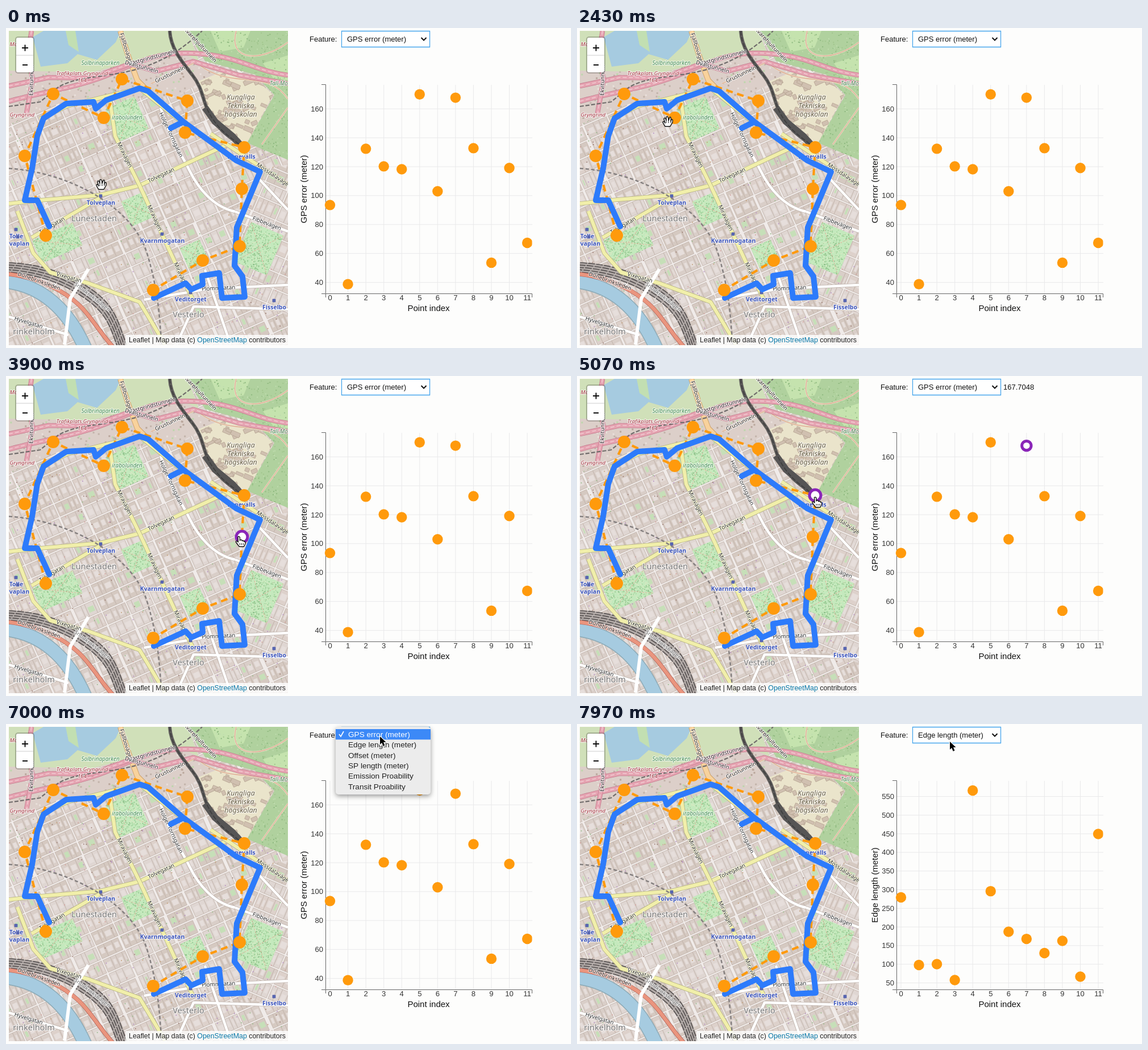
An HTML page with a canvas that plays this animation: 994x563 px, repeating every 8000 ms.

```html
<!DOCTYPE html>
<html lang="en">
<head>
<meta charset="utf-8">
<title>Map matching and point features</title>
<style>
html, body { margin: 0; width: 100%; height: 100%; overflow: hidden; background: #fdfdfc; }
canvas { display: block; }
</style>
</head>
<body>
<canvas id="stage" width="994" height="563"></canvas>
<script>
const W = 994, H = 563, LOOP = 8000;
const SANS = '"Liberation Sans", Arial, sans-serif';
const MAP_FONT = '"Noto Sans", sans-serif';
const ORANGE = '#ff9a0c', PURPLE = '#8a25b8', BLUE = '#2d7bfb';
const GRID_ANGLE = -24, EAST_ANGLE = 23;
const stage = document.getElementById('stage').getContext('2d');
let ctx = stage;

let seed = 7;
const random = () => (seed = (seed * 16807) % 2147483647) / 2147483647;
const pick = list => list[Math.floor(random() * list.length)];

function fill(path, color) {
  ctx.fillStyle = color;
  ctx.fill(new Path2D(path));
}

function line(path, color, width, dash = []) {
  ctx.strokeStyle = color;
  ctx.lineWidth = width;
  ctx.setLineDash(dash);
  ctx.stroke(new Path2D(path));
  ctx.setLineDash([]);
}

function placed(x, y, degrees, paint) {
  ctx.save();
  ctx.translate(x, y);
  ctx.rotate(degrees * Math.PI / 180);
  paint();
  ctx.restore();
}

function clipped(path, paint) {
  ctx.save();
  ctx.clip(new Path2D(path));
  paint();
  ctx.restore();
}

function text(string, x, y, size = 13, color = '#111', align = 'left') {
  ctx.font = `${size}px ${SANS}`;
  ctx.textAlign = align;
  ctx.fillStyle = color;
  ctx.fillText(string, x, y);
}

function label(string, x, y, size, color, degrees = 0, style = '') {
  placed(x, y, degrees, () => {
    ctx.font = `${style} ${size}px ${MAP_FONT}`;
    ctx.textAlign = 'center';
    ctx.textBaseline = 'middle';
    ctx.strokeStyle = 'rgba(255,255,255,.7)';
    ctx.lineWidth = 2.2;
    ctx.strokeText(string, 0, 0);
    ctx.fillStyle = color;
    ctx.fillText(string, 0, 0);
  });
}

// Writes a name on a path, turned to the direction of the path there.
function labelAlong(path, name, fraction, color = '#292929') {
  const curve = document.createElementNS('http://www.w3.org/2000/svg', 'path');
  curve.setAttribute('d', path);
  const at = curve.getTotalLength() * fraction;
  const a = curve.getPointAtLength(at - 9), b = curve.getPointAtLength(at + 9);
  const degrees = Math.atan((b.y - a.y) / (b.x - a.x)) * 180 / Math.PI;
  label(name, (a.x + b.x) / 2, (a.y + b.y) / 2, 9.8, color, degrees);
}

function house(x, y, w, h, color, edge) {
  ctx.fillStyle = color;
  ctx.fillRect(x, y, w, h);
  ctx.strokeStyle = edge;
  ctx.lineWidth = .7;
  ctx.strokeRect(x, y, w, h);
}

// City blocks: terraced houses round small courtyards.
function blocks(x, y, degrees, w, h) {
  const street = 3, reach = 480;
  placed(x, y, degrees, () => {
    for (let u = -reach; u < reach; u += w + street) {
      for (let v = -reach; v < reach; v += h + street) {
        const tone = pick(['#d9cec8', '#ddd1cb', '#d5c9c1', '#dfd6d2']);
        for (let p = 0; p < w - 5;) {
          const lot = Math.min(7 + random() * 9, w - p);
          house(u + p, v, lot, h, tone, '#bfb1a8');
          ctx.fillStyle = random() < .12 ? '#c6dfb8' : '#e6dedb';
          ctx.fillRect(u + p + 2.5, v + 5 + random() * 3, Math.max(1, lot - 5), h - 13);
          p += lot;
        }
      }
    }
  });
}

function speckle(count, colors, size, x, y, w, h) {
  for (let i = 0; i < count; i++) {
    ctx.fillStyle = pick(colors);
    ctx.fillRect(x + random() * w, y + random() * h, size, size);
  }
}

function park(x, y, w, h, degrees) {
  placed(x, y, degrees, () => {
    const plot = `M${-w / 2} ${-h / 2}h${w}v${h}h${-w}Z`;
    fill(plot, '#c4e9bd');
    clipped(plot, () => {
      speckle(w * h / 9, ['#8cc088', '#a6d59f', '#d9e8c2'], 1.7, -w / 2, -h / 2, w, h);
      line(`M${-w / 2} ${-h / 2}L${w / 2} ${h / 2}M${-w / 2} ${h / 2}L${w / 2} ${-h / 2}`, '#dfb39c', 1, [3, 2]);
    });
  });
}

const EAST = 'M447 250L403 325 412 350 404 420 420 480 496 505V240Z';
const LAKE = 'M47 16L66 5H202L193 25 160 56 126 46 108 62 61 68Z';
const FOREST = 'M318 5H496V232L424 202 472 118 438 82 350 58Z';
const CAMPUS = 'M335 95L385 75 436 84 470 118 423 204 352 150Z';
const CANAL = 'M0 446C62 454 108 492 140 565';
const RAILYARD = 'M0 421C60 424 105 440 145 468S190 520 206 565';
const EAST_RAIL = 'M288 5C290 35 306 55 328 83S344 133 365 162 395 190 421 214';
const METRO = 'M5 247C120 255 225 320 248 396S270 520 274 557';

function drawTerrain() {
  fill('M0 0H500V560H0Z', '#f0ebe9');
  blocks(170, 230, GRID_ANGLE, 42, 23);
  clipped(EAST, () => {
    fill(EAST, '#f0ebe9');
    blocks(440, 330, EAST_ANGLE, 40, 25);
  });
  speckle(420, ['#b68fc4', '#d3a09c', '#c3a07b', '#9a7b72', '#95ba8a'], 1.7, 5, 160, 490, 397);

  fill('M5 5H320L340 60 250 112 120 118 40 150 5 158Z', '#d0e0b9');
  clipped('M5 75L150 78 300 40 380 75 300 120 105 128 5 170Z', () => {
    fill('M0 0H400V200H0Z', '#dccfc9');
    speckle(420, ['#b9a69b', '#e8dfda', '#bdd6ac', '#c2b3aa'], 3, 5, 40, 370, 130);
  });
  fill(LAKE, '#a6cbe0');
  fill('M105 5H122L128 42 110 30Z', '#c2dfb2');
  fill(FOREST, '#b0d19e');
  fill('M360 5H430L418 34 376 42ZM452 62L496 48V92L470 88Z', '#c5e3ae');
  clipped(FOREST, () => speckle(700, ['#8fba80', '#a2c68e', '#bfdcae'], 2, 318, 5, 178, 225));
  fill(CAMPUS, '#eae4cb');
  clipped(CAMPUS, () => {
    for (let i = 0; i < 75; i++) {
      placed(340 + random() * 128, 80 + random() * 118, pick([GRID_ANGLE, EAST_ANGLE]), () =>
        house(0, 0, 5 + random() * 14, 4 + random() * 5, '#d0c0b0', '#b3a18f'));
    }
  });

  park(213, 160, 56, 62, GRID_ANGLE);
  park(233, 318, 46, 48, GRID_ANGLE);
  park(90, 378, 78, 44, GRID_ANGLE);
  park(331, 398, 38, 40, GRID_ANGLE);
  park(445, 388, 62, 76, EAST_ANGLE);
}

const ROAD_STYLES = {
  path: { color: '#dca98c', width: 1.2, casing: '#efe2cf' },
  street: { color: '#fff', width: 4.5, casing: '#bdb1aa' },
  avenue: { color: '#f1efaa', width: 6, casing: '#b5b283' },
  primary: { color: '#f8d29c', width: 8, casing: '#c99b60' },
  quay: { color: '#ea957e', width: 6, casing: '#b2645a' },
  motorway: { color: '#e5a3b1', width: 7, casing: '#c47a8d', centre: '#f2cbd2' },
};

// Style, path, name, and how far along the path the name stands.
const ROADS = [
  ['path', 'M340 65C400 110 460 70 496 125M405 5C390 60 450 60 496 25M450 205L496 140'],
  ['street', 'M272 140C286 190 308 220 323 251S365 315 403 323', 'Holger Tornsgatan', .22],
  ['street', 'M403 323L496 358', 'Fibbevägen', .6],
  ['street', 'M243 478L355 459 496 452', 'Plommgatan', .52],
  ['street', 'M5 508L110 540', 'Hyvelgatan', .33],
  ['street', 'M300 557L330 490 496 495M350 425L395 557M440 260L496 320'],
  ['avenue', 'M5 309L60 303 165 294 235 277 385 207', 'Tolvegatan', .69],
  ['avenue', 'M45 369L165 299', 'Tolvegatan', .3],
  ['avenue', 'M183 128L192 190 235 277 310 440 330 480', 'Miravägen', .26, .58, .87],
  ['avenue', 'M20 322L48 396 78 430 145 449 235 482 280 557', 'Vixegatan', .42],
  ['avenue', 'M360 186L496 276', 'Mossdalavägen', .82],
  ['avenue', 'M60 160L108 137 235 106 312 168'],
  ['primary', 'M201 5L216 52 231 92 250 111', 'Fjällbovägen', .28],
  ['motorway', 'M5 129C65 112 130 105 190 78S285 39 350 46 440 76 496 83', 'Västgrindstunneln', .52],
  ['motorway', 'M5 102L75 87 150 88 218 63 264 76 330 59 410 83 496 98', 'Dvalstunneln', .475],
  ['motorway', 'M45 5L38 50 47 90 36 150', 'Ekvitunneln', .6],
  ['path', 'M255 98L330 62', 'Grustunneln', .45],
  ['path', 'M318 5L365 55', 'Kvarnhjultunneln', .5],
  ['quay', 'M5 433C70 441 118 472 142 502S174 547 192 565', 'Dunebrinksleden', .23],
];

function drawRoads() {
  line(CANAL, '#8eabb7', 25);
  line(CANAL, '#a6cbe0', 22);
  line(RAILYARD, '#b3aba8', 19);
  for (let shift = -8; shift <= 8; shift += 4) {
    placed(shift * .7, -shift, 0, () => line(RAILYARD, '#575252', 1.7, [12, 2]));
  }
  for (const [kind, path] of ROADS) {
    const { color, width, casing, centre } = ROAD_STYLES[kind];
    line(path, casing, width + 1.6);
    line(path, color, width);
    if (centre) line(path, centre, 1.5, [7, 4]);
  }
  line('M145 424L113 476 103 557', '#fff', 6);
  line('M5 138L60 130 92 104C150 70 240 105 345 5', '#706c6b', 2.2, [7, 3]);
  line(EAST_RAIL, '#5c5a59', 6);
  line('M350 140L368 165 398 190 420 214', '#565555', 12);
  line(EAST_RAIL, '#3c3c3c', 1.5, [8, 3]);
  line(METRO, '#858080', 2.5, [6, 4]);
}

const PLACES = [
  { color: '#a4313d', size: 9.7, style: 'italic',
    names: { 'Trafikplats Gryngrind': [134, 80], '164': [134, 92], 's Gryngrind': [25, 153], 'Mosse': [20, 29] } },
  { color: '#3e8a50', size: 9.9, style: 'italic',
    names: { 'Solbrinaparken': [166, 62], 'irabolunden': [213, 158], 'Tall-Mo': [480, 98] } },
  { color: '#696047', size: 12.5, style: 'italic',
    names: { 'Kungliga': [413, 122], 'Tekniska': [413, 137], 'högskolan': [413, 152] } },
  { color: '#3c55bd', size: 10.5, style: '600', stop: true,
    names: { 'Tolveplan': [167, 308], 'Kvarnmogatan': [275, 375], 'Veditorget': [325, 478], 'Lunevalls': [414, 227],
      'Fisselbo': [472, 492], 'Tolle': [18, 367], 'rvaplan': [21, 380] } },
  { color: '#777', size: 14.5, style: '',
    names: { 'Lunestaden': [155, 336], 'Vesterlo': [321, 505], 'rinkelholm': [49, 535] } },
];

function drawNames() {
  for (const [, path, name, ...fractions] of ROADS) {
    for (const fraction of fractions) labelAlong(path, name, fraction);
  }
  labelAlong(RAILYARD, 'Snodkroksbågen', .6, '#777');
  for (const { color, size, style, stop, names } of PLACES) {
    for (const [name, [x, y]] of Object.entries(names)) {
      if (stop) house(x - 3, y - 15, 5, 5, '#5967b4', '#4a57a5');
      label(name, x, y, size, color, 0, style);
    }
  }
}

const POINT_RADIUS = 11;
const mapPoints = [[70, 365], [33, 225], [83, 116], [172, 158], [204, 90], [319, 128],
  [315, 184], [419, 210], [415, 283], [411, 384], [346, 409], [259, 461]];
const ROUTE = 'M260 475L316 449 326 460 346 451 345 436 375 431 380 475 420 473 416 437 402 418 406 351 447 253 ' +
  '405 233 312 165 250 111 235 106 176 127 158 142 154 130 106 133 66 159 55 190 46 247 33 303H55L76 349M312 165L290 176';

function drawControls() {
  ctx.fillStyle = 'rgba(0,0,0,.22)';
  ctx.beginPath();
  ctx.roundRect(16, 15, 34, 65, 5);
  ctx.fill();
  ctx.fillStyle = '#fff';
  ctx.beginPath();
  ctx.roundRect(18, 17, 30, 61, 3);
  ctx.fill();
  line('M18 48H48', '#ccc', 1);
  line('M28 35H39M33.5 29.5V40.5M29 65H38', '#111', 2);
  ctx.fillStyle = 'rgba(255,255,255,.8)';
  ctx.fillRect(210, 540, 286, 18);
  const parts = [['Leaflet | Map data (c) ', '#222'], ['OpenStreetMap', '#0878a8'], [' contributors', '#222']];
  let x = 216;
  for (const [part, color] of parts) {
    text(part, x, 553, 12.4, color);
    x += ctx.measureText(part).width;
  }
}

function buildMap() {
  const layer = document.createElement('canvas');
  layer.width = W;
  layer.height = H;
  ctx = layer.getContext('2d');
  ctx.beginPath();
  ctx.rect(5, 5, 491, 553);
  ctx.clip();
  ctx.lineJoin = 'round';
  drawTerrain();
  drawRoads();
  drawNames();
  line('M' + mapPoints.join('L'), ORANGE, 4.2, [12, 8]);
  ctx.lineCap = 'round';
  line(ROUTE, BLUE, 10);
  ctx.lineCap = 'butt';
  drawControls();
  ctx = stage;
  return layer;
}

const charts = [
  { name: 'GPS error (meter)', zero: 549.4, scale: 2.545, first: 40, last: 160, step: 20,
    values: [93.5127, 38.7983, 132.4206, 120.2314, 118.2451, 170.0182, 103.0269, 167.7048, 132.8164, 53.6275, 119.1038, 67.3416] },
  { name: 'Edge length (meter)', zero: 488.3, scale: .656, first: 50, last: 550, step: 50,
    values: [279.4, 98, 100.3, 57.6, 566, 296, 187.2, 168, 130, 162.8, 66.8, 449.4] },
];
const options = [...charts.map(c => c.name), 'Offset (meter)', 'SP length (meter)', 'Emission Proability', 'Transit Proability'];

function dot(x, y, r, active) {
  ctx.beginPath();
  ctx.arc(x, y, active ? r - 1 : r, 0, 7);
  ctx.fillStyle = active ? '#fff' : ORANGE;
  ctx.fill();
  if (!active) return;
  ctx.strokeStyle = PURPLE;
  ctx.lineWidth = 5;
  ctx.stroke();
}

function drawChart(chart, active) {
  const xAt = i => 570 + 31.55 * i, yAt = v => chart.zero - chart.scale * v;
  chart.values.forEach((_, i) => {
    line(`M${xAt(i)} 100V467`, '#e9e9ea', 1);
    text(i, xAt(i), 479, 13, '#333', 'center');
  });
  for (let v = chart.first; v <= chart.last; v += chart.step) {
    line(`M562 ${yAt(v)}H926`, '#e9e9ea', 1);
    text(v, 558, yAt(v) + 4.5, 13, '#333', 'right');
  }
  line('M555 99.5H562.5V467M555 467.5H562M562.5 474V467.5H925.5V474', '#666', 1);
  text('Point index', 743.5, 498, 15, '#111', 'center');
  placed(529, 283.5, -90, () => text(chart.name, 0, 0, 15, '#111', 'center'));
  clipped('M555 95H925.5V470H555Z', () =>
    chart.values.forEach((v, i) => dot(xAt(i), yAt(v), 9.2, i === active)));
}

function drawSelect(name, value) {
  text('Feature:', 534, 24);
  ctx.fillStyle = '#fff';
  ctx.fillRect(590, 5, 156, 29);
  line('M590.5 5.5H745.5V33.5H590.5Z', '#46a5ec', 1.3);
  text(name, 600, 24);
  line('M730.5 17L735 21.5 739.5 17', '#111', 2);
  text(value, 750, 23.5);
}

function drawMenu(chosen) {
  const row = 18.4;
  ctx.save();
  ctx.shadowColor = 'rgba(0,0,0,.4)';
  ctx.shadowBlur = 9;
  ctx.shadowOffsetY = 3;
  ctx.fillStyle = '#ececec';
  ctx.beginPath();
  ctx.roundRect(580, 5, 167, 119, 5);
  ctx.fill();
  ctx.restore();
  ctx.fillStyle = '#3c89f7';
  ctx.fillRect(580, 9 + chosen * row, 167, row);
  options.forEach((name, i) => text(name, 602, 22.7 + i * row, 13.6, i === chosen ? '#fff' : '#222'));
  line('M586 18L589 22 594 13', chosen ? '#222' : '#fff', 1.7);
}

// The cursor rests at each stop from its arrival until it leaves.
const over = (i, dx, dy) => ({ x: mapPoints[i][0] + dx, y: mapPoints[i][1] + dy });
const stops = [
  { arrive: 0, leave: 350, x: 167, y: 275 },
  { arrive: 1100, leave: 1750, ...over(1, 2, -3) },
  { arrive: 2560, leave: 2900, ...over(3, -4, 2) },
  { arrive: 3950, leave: 4330, ...over(8, -4, 1) },
  { arrive: 4800, leave: 5350, ...over(7, 0, 4) },
  { arrive: 6350, leave: 7060, x: 658, y: 22 },
  { arrive: 7300, leave: LOOP, x: 656, y: 31 },
];

function cursorAt(t) {
  const next = stops.findIndex(stop => stop.leave > t);
  const to = stops[next], from = stops[next - 1];
  if (!from || t >= to.arrive) return to;
  const u = (t - from.leave) / (to.arrive - from.leave), s = u * u * (3 - 2 * u);
  return { x: from.x + (to.x - from.x) * s, y: from.y + (to.y - from.y) * s };
}

function hoveredAt(t) {
  const { x, y } = cursorAt(t);
  return mapPoints.findIndex(([px, py]) => Math.hypot(px - x, py - y) < POINT_RADIUS);
}

const ARROW = 'M0 0V14L3.2 11 5.7 17 8.5 15.8 6 10H10.5Z';
const POINTER = 'M-1.5 0C0-2 2 0 2 1V6C4 4 6 5 6 7 8 5 9 7 9 8 11 7 12 9 11.5 12L9 17H1L-5 9C-5 6-3 7-1 9Z';
const GRAB = 'M-4 9L-8 2C-8-1-5 0-4 3L-6-4C-6-7-3-7-2-1L-2-7C-1-10 2-9 2-1L4-7C6-9 7-6 6 0L7-3C9-5 10-2 9 2L5 9Z';

function drawCursor(t, hovering) {
  const { x, y } = cursorAt(t);
  placed(x, y, 0, () => {
    ctx.lineJoin = 'round';
    if (x > 496) {
      line(ARROW, '#fff', 2.4);
      fill(ARROW, '#000');
      return;
    }
    const shape = hovering ? POINTER : GRAB;
    fill(shape, '#fff');
    line(shape, '#111', 1.4);
    line(hovering ? 'M2 11V14M5 11V14M8 11V14' : 'M-2 0V3M2 0V3M6 0V3', '#111', 1);
  });
}

const mapLayer = buildMap();
const CHART_DELAY = 120, MENU_OPEN = 6550, MENU_CLOSE = 7650;

function draw() {
  const t = performance.now() % LOOP;
  const hovered = hoveredAt(t), active = hoveredAt(t - CHART_DELAY);
  const chart = charts[t < MENU_CLOSE ? 0 : 1];
  ctx.fillStyle = '#fdfdfc';
  ctx.fillRect(0, 0, W, H);
  ctx.drawImage(mapLayer, 0, 0);
  mapPoints.forEach(([x, y], i) => dot(x, y, POINT_RADIUS, i === hovered));
  drawChart(chart, active);
  drawSelect(chart.name, active < 0 ? '' : chart.values[active].toFixed(4));
  if (t >= MENU_OPEN && t < MENU_CLOSE) drawMenu(cursorAt(t).y > 27 ? 1 : 0);
  drawCursor(t, hovered >= 0);
  requestAnimationFrame(draw);
}
draw();
</script>
</body>
</html>
```
